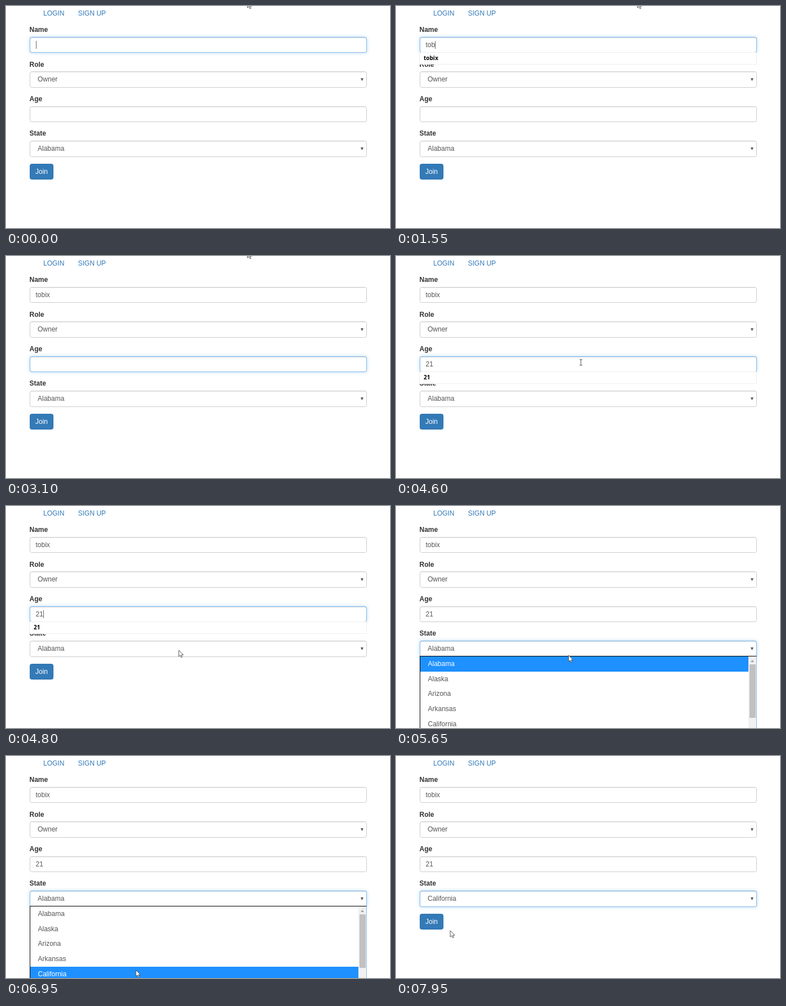
Write an HTML page that moves like this. It is 680x394 px and loops after 8 s.

```html
<!DOCTYPE html>
<html lang="en">
<head>
<meta charset="utf-8">
<title>Sign up form</title>
<style>
  html, body { margin: 0; width: 100%; height: 100%; overflow: hidden; background: #fff; }
  #stage { position: relative; width: 680px; height: 394px; overflow: hidden;
    font: 12px/20px "Liberation Sans", Arial, sans-serif; color: #555; white-space: pre; }
  #stage * { position: absolute; box-sizing: border-box; }
  .link { top: 3px; color: #337ab7; }
  .label { left: 41.5px; color: #333; font-weight: bold; }
  .field { left: 42px; width: 597px; height: 28.4px; border: 1px solid #ccc; border-radius: 3.5px;
    background: #fff; box-shadow: inset 0 1px 1px rgba(0,0,0,.075); }
  .glow { inset: -1px; border: 1px solid #80b9ea; border-radius: 3.5px;
    box-shadow: inset 0 1px 1px rgba(0,0,0,.06), 0 0 6px rgba(102,175,233,.45); }
  .text { left: 9.5px; top: 3px; }
  .select .text { left: 13px; }
  .caret { left: 100%; top: 3px; width: 1px; height: 14px; background: #666; }
  .select::after { content: ""; position: absolute; left: 585px; top: 11px; width: 5px; height: 5px;
    background: #555; clip-path: polygon(0 0, 100% 0, 50% 100%); }
  .hint { left: 41px; width: 598px; height: 22px; padding-left: 7px; background: #fff; z-index: 1;
    border: 1px solid #eee; color: #000; font: bold 10px/19px "Open Sans", sans-serif; }
  #join { left: 42px; top: 280px; width: 42px; height: 28px; border: 1px solid #2e73ad;
    border-radius: 3.5px; background: #337ab7; color: #fff; line-height: 26px; text-align: center; }
  #list { left: 42px; top: 266px; width: 597px; height: 140px; background: #fff;
    border: 1px solid #000; border-right-color: #8ab8e8; }
  .row { left: 0; width: 581px; height: 26.65px; padding-left: 13.5px; line-height: 27px; }
  .row.on { background: #1e90ff; color: #fff; }
  #bar { left: 581px; top: 0; width: 14px; height: 140px; background: #f1f1f1; }
  #bar::before { content: ""; position: absolute; left: 4px; top: 6px; width: 6px; height: 4px;
    background: #a3a3a3; clip-path: polygon(50% 0, 100% 100%, 0 100%); }
  #bar::after { content: ""; position: absolute; left: 2px; top: 14px; width: 11px; height: 95px;
    background: #c1c1c1; }
  #mouse { left: 0; top: 0; overflow: visible; z-index: 2; }
</style>
</head>
<body>
<div id="stage"></div>
<script>
const LOOP = 8000, BLINK = 530, FADE = 150, LIST_TOP = 267, ROW = 26.65;
const FIRST = 55, PITCH = 61.37, HEIGHT = 28.4;
const OPEN = 5250, PICK = 7330;
const states = ["Alabama", "Alaska", "Arizona", "Arkansas", "California"];

// focus: time span in ms; keys: when the caret restarts, one character per key after the first
const fields = [
  { label: "Name", focus: [-1000, 2050], word: "tobix", keys: [0, 60, 260, 480, 1650, 1850] },
  { label: "Role", focus: [2050, 2550], value: "Owner" },
  { label: "Age", focus: [2550, 5150], word: "21", keys: [2550, 3650, 3740] },
  { label: "State", focus: [5150, 9999], value: "Alabama" },
];

// time, x, y of the pointer tip
const path = [
  [0, 427.5, -8], [4250, 427.5, -8], [4600, 327.5, 188.5], [4800, 306, 256], [5620, 306, 256],
  [6100, 300, 394], [6200, 299, 398], [6450, 297, 425], [6740, 240, 425], [6950, 230, 380],
  [7400, 230, 380], [7900, 96, 310], [LOOP, 96, 310],
];

const stage = document.getElementById("stage");

function add(parent, cls, text = "", style = {}) {
  const el = document.createElement("div");
  el.className = cls;
  el.textContent = text;
  Object.assign(el.style, style);
  parent.append(el);
  return el;
}

const show = (el, on) => { el.style.display = on ? "" : "none"; };
const clamp = v => Math.min(1, Math.max(0, v));
const ease = v => { v = clamp(v); return v * v * (3 - 2 * v); };

add(stage, "link", "LOGIN", { left: "66px" });
add(stage, "link", "SIGN UP", { left: "127.5px" });
fields.forEach((f, i) => {
  f.top = FIRST + PITCH * i;
  add(stage, "label", f.label, { top: f.top - 22.7 + "px" });
  const box = add(stage, f.word ? "field" : "field select", "", { top: f.top + "px" });
  f.glow = add(box, "glow");
  f.text = add(box, "text", f.value);
  if (!f.word) return;
  f.typed = document.createTextNode("\u200b");
  f.text.append(f.typed);
  f.caret = add(f.text, "caret");
  f.hint = add(stage, "hint", f.word, { top: f.top + 27 + "px" });
});
add(stage, "", "Join").id = "join";

const list = add(stage, "");
list.id = "list";
const rows = states.map((name, i) => add(list, "row", name, { top: i * ROW + "px" }));
add(list, "").id = "bar";

stage.insertAdjacentHTML("beforeend", `<svg id="mouse" width="1" height="1">
  <path id="arrow" d="M0 0V11.2L2.6 8.8L4.4 12.8L6.2 12L4.5 8.2H8Z" fill="#fff" stroke="#444" stroke-width=".9"/>
  <path id="beam" d="M-2.5-5H2.5M0-5V5M-2.5 5H2.5" fill="none" stroke="#555"/></svg>`);
const [mouse, arrow, beam] = ["mouse", "arrow", "beam"].map(id => document.getElementById(id));

function pointer(t) {
  const i = path.findIndex(p => p[0] > t);
  const [a, b] = [path[i - 1], path[i]];
  const k = (t - a[0]) / (b[0] - a[0]);
  return [a[1] + (b[1] - a[1]) * k, a[2] + (b[2] - a[2]) * k];
}

function draw(t) {
  for (const f of fields) {
    const [start, end] = f.focus;
    f.glow.style.opacity = ease((t - start) / FADE) * (1 - ease((t - end) / FADE));
    if (!f.word) continue;
    const active = t >= start && t < end;
    const past = f.keys.filter(k => k <= t);
    f.typed.data = f.word.slice(0, Math.max(0, past.length - 1)) || "\u200b";
    show(f.caret, active && (t - past.at(-1)) % (2 * BLINK) < BLINK);
    show(f.hint, active && past.length > 1);
  }
  fields[3].text.textContent = states[t < PICK ? 0 : 4];

  const [x, y] = pointer(t);
  show(list, t >= OPEN && t < PICK);
  const hover = Math.max(0, Math.floor((y - LIST_TOP) / ROW));
  rows.forEach((row, i) => row.classList.toggle("on", i === hover));

  const inInput = fields.some(f => f.word && y > f.top && y < f.top + HEIGHT);
  show(beam, inInput);
  show(arrow, !inInput);
  mouse.style.transform = `translate(${x}px, ${y}px)`;
}

const begin = performance.now();
function tick() {
  draw((performance.now() - begin) % LOOP);
  requestAnimationFrame(tick);
}
tick();
</script>
</body>
</html>
```
